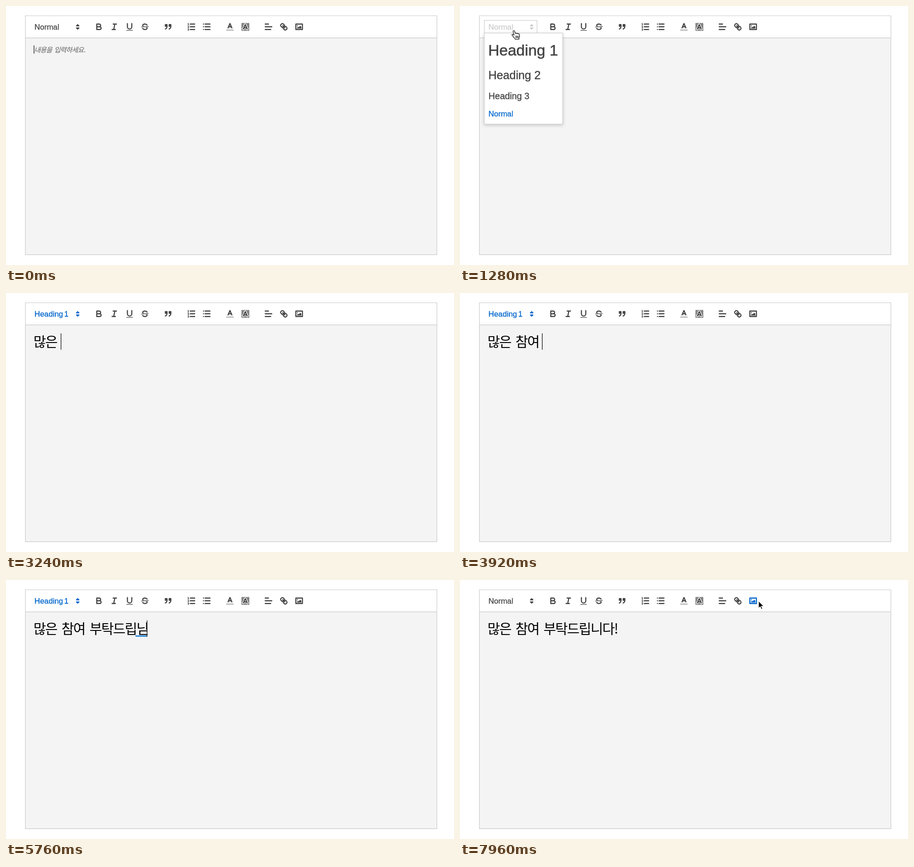
Recreate the animation shown at these times as an HTML page. Size 983 by 570 pixels, loop 8000 ms.

```html
<!DOCTYPE html>
<html lang="ko">
<head>
<meta charset="utf-8">
<title>Text editor</title>
<style>
  html, body { margin: 0; width: 100%; height: 100%; overflow: hidden; background: #fff; }
  svg { display: block; width: 983px; height: 570px; }
  .ui { font: 16.8px "Liberation Sans", Arial, sans-serif; fill: currentColor; stroke: currentColor; stroke-width: .018em; }
  .ko { font-family: "Noto Sans CJK KR", "Noto Sans CJK", sans-serif; }
  .hint { font-size: 15px; font-style: italic; letter-spacing: -.9px; word-spacing: 1.65px; fill: #000; fill-opacity: .6; }
  .title { font-size: 30px; letter-spacing: -1.8px; word-spacing: 3.3px; white-space: pre; }
  .icon { color: #444; fill: none; stroke: currentColor; stroke-width: 2; stroke-linecap: round; stroke-linejoin: round; }
  .icon .solid { fill: currentColor; stroke: none; }
  .icon .both { fill: currentColor; }
  .icon .even { fill: currentColor; fill-rule: evenodd; }
  .icon .thin { stroke-width: 1; }
  .icon .faint { opacity: .4; }
  .icon .halo { stroke: #fff; stroke-width: 4.2; }
  #list { color: #444; }
</style>
</head>
<body>
<svg viewBox="0 0 983 570">
  <defs>
    <pattern id="hatch" width="2.1" height="2.1" patternUnits="userSpaceOnUse" patternTransform="rotate(40)">
      <rect width="1" height="2.1" fill="currentColor"/>
    </pattern>
    <filter id="shadow" x="-20%" y="-20%" width="140%" height="140%">
      <feDropShadow dx="0" dy="2" stdDeviation="3.6" flood-color="#000" flood-opacity=".2"/>
    </filter>
  </defs>

  <rect x="42.5" y="70" width="903" height="477.3" fill="#f4f4f4"/>
  <path d="M42.5 21.5H945.5V547.4H42.5ZM42.5 70.2H945.5" fill="none" stroke="#c9c9c9" stroke-width="1.2"/>

  <text id="hint" class="ko hint" x="62" y="101.6">내용을 입력하세요.</text>
  <text id="title" class="ko title" x="60.2" y="118"></text>
  <rect id="compose" y="122" width="25.2" height="2.7" fill="#1a7fdc"/>
  <rect id="caret" width="1.2"/>

  <g id="icons"></g>

  <g id="picker">
    <rect id="frame" x="53.3" y="31.6" width="115.6" height="28" fill="none" stroke="#ccc" stroke-width="1.2"/>
    <text id="label" class="ui" x="62.6" y="52"></text>
    <g class="icon" style="color:inherit" transform="translate(146.5 35.2) scale(1.2)">
      <path class="solid" d="M6 11.4 9 14.2 12 11.4V10H6ZM6 6.6 9 3.8 12 6.6V8H6Z" stroke-linejoin="round"/>
    </g>
  </g>

  <g id="list">
    <rect x="53.3" y="59.5" width="172" height="200.4" fill="#fff" stroke="#ccc" stroke-width="1.2" filter="url(#shadow)"/>
    <text id="first" class="ui" x="62" y="109" style="font-size:33.6px">Heading 1</text>
    <text class="ui" x="62.2" y="161.4" style="font-size:25.2px">Heading 2</text>
    <text class="ui" x="62.5" y="205" style="font-size:19.66px">Heading 3</text>
    <text class="ui" x="62.6" y="242.5" style="color:#06c">Normal</text>
  </g>

  <g id="mouse">
    <g id="beam" fill="none" stroke-linecap="round">
      <path id="beamShape" d="M-3.4-9C-1.4-9 0-8.2 0-6.6V6.6C0 8.2-1.4 9-3.4 9M3.4-9C1.4-9 0-8.2 0-6.6M0 6.6C0 8.2 1.4 9 3.4 9M-2 .8H2" stroke="#fff" stroke-width="3"/>
      <use href="#beamShape" style="stroke:#111"/>
      <path d="M-3.4-9C-1.4-9 0-8.2 0-6.6V6.6C0 8.2-1.4 9-3.4 9M3.4-9C1.4-9 0-8.2 0-6.6M0 6.6C0 8.2 1.4 9 3.4 9M-2 .8H2" stroke="#111" stroke-width="1.4"/>
    </g>
    <g id="hand" fill="#fff" stroke="#111" stroke-width="1.3" stroke-linejoin="round" stroke-linecap="round">
      <path d="M-1.6 .9C-1.9-.8.8-1.6 1.6.4L3.6 5.6C4.1 4.3 6.3 4.4 6.8 5.9C7.3 4.9 9.2 5 9.7 6.4C10.4 5.7 12 6 12.2 7.6C13 10.5 13 12.5 11.4 15V18.2H3.2C2.8 16.4 0 14.4-1.6 11.8C-2.6 10.2-3.8 9.4-4 8.4C-3.9 6.8-1.8 7 .6 9Z"/>
      <path d="M4.6 11v4M7 11v4M9.4 11v4" fill="none"/>
    </g>
    <path id="arrow" d="M0 0V16.4L3.7 12.8 6.2 18.6 8.9 17.5 6.4 11.8H11.6Z" fill="#000" stroke="#fff" stroke-width="1.3"/>
  </g>
</svg>

<script>
const LOOP = 8000, BLUE = '#06c', GREY = '#444', LIGHT = '#ccc';
const OPEN = 1200, PICK = 1960, TYPE = 2360, LAST_KEY = 6040, BLUR = 7800, DIALOG = 7900;
const $ = id => document.getElementById(id);

const path = (d, cls = '') => `<path class="${cls}" d="${d}"/>`;
const letterA = (y, cls) => path(`M5.5 ${y}L9 ${y - 8} 12.5 ${y}M11.63 ${y - 2}H6.38`, cls);

// Each icon: centre x and its drawing on an 18-unit grid.
const icons = [
  [204, path('M5 4H9.5A2.5 2.5 0 0 1 9.5 9H5ZM5 9H10.5A2.5 2.5 0 0 1 10.5 14H5Z')],
  [237.6, path('M7 4H13M5 14H11M8 14L10 4')],
  [271.2, path('M5 3V9a4 4 0 0 0 8 0V3') + '<rect class="solid" x="3" y="15" width="12" height="1" rx=".5"/>'],
  [304.8, path('M15.5 8.5L2.5 9.5', 'thin') +
    path('M9 8C6.54 7.79 6 7.52 6 6.5 6 5.79 7.28 5 9 5c1.57 0 2.77.68 2.97 1.31a1 1 0 0 0 1.9-.62C13.36 4.1 11.35 3 9 3 6.2 3 4 4.54 4 6.5a3.2 3.2 0 0 0 .5 1.84Z', 'solid') +
    path('M9 10C11.46 10.21 12 10.48 12 11.5c0 .71-1.28 1.5-3 1.5-1.57 0-2.77-.68-2.97-1.31a1 1 0 1 0-1.9.62C4.64 13.9 6.65 15 9 15c2.8 0 5-1.54 5-3.5a3.2 3.2 0 0 0-.5-1.84Z', 'solid')],
  [355.7, [4, 11].map(x => path(`M${x} 5h3v3h-3Z`, 'both') + path(`M${x + 3} 8c0 4.03-3 5-3 5`, 'even')).join('')],
  [406.8, path('M7 4H15M7 9H15M7 14H15') + path('M2.4 3L3.5 2.5V5.5M2.5 5.5H4.5', 'thin') +
    path('M4.5 10.5h-2c0-.23 1.85-1.08 1.85-2.23A.96.96 0 0 0 2.5 8.16', 'thin') +
    path('M2.5 14.85a.96.96 0 0 0 1.85-.11A.7.7 0 0 0 3.75 14a.69.69 0 0 0 .6-.74.96.96 0 0 0-1.85-.11', 'thin')],
  [440.4, path('M6 4H15M6 9H15M6 14H15M3 4h0M3 9h0M3 14h0')],
  [491.4, letterA(11) + path('M3 15H15', 'faint')],
  [525, '<rect x="2" y="2" width="14.4" height="14.4" fill="url(#hatch)" stroke="none"/>' + letterA(13, 'halo') + letterA(13)],
  [576, path('M3 9H15M3 14H13M3 4H9')],
  [609.6, path('M7 7L11 11') +
    path('M8.9 4.58a3.48 3.48 0 0 1 .36 4.68A3.48 3.48 0 0 1 4.58 8.9C3.19 7.5 2.04 6.4 4.22 4.22S7.5 3.19 8.9 4.58Z') +
    path('M13.42 9.1a3.48 3.48 0 0 0-4.68-.36 3.48 3.48 0 0 0 .36 4.68c1.39 1.39 2.5 2.54 4.68.36S14.8 10.5 13.42 9.1Z')],
  [643.2, path('M3 4H15V14H3Z') + '<circle class="solid" cx="6" cy="7" r="1"/>' +
    path('M5 12V11L7 9 8 10 11 7 13 9V12Z', 'solid')]
];
$('icons').innerHTML = icons.map(([x, art]) =>
  `<g class="icon" transform="translate(${x - 10.8} 35) scale(1.2)">${art}</g>`).join('');
const iconNodes = [...$('icons').children];

// Keystrokes: time and the text after it.
const typing = [
  [2360, 'ㅁ'], [2480, '마'], [2640, '만'], [2800, '많'], [2920, '많ㅇ'], [3000, '많으'], [3120, '많은'], [3240, '많은 '],
  [3360, '많은 ㅊ'], [3440, '많은 차'], [3520, '많은 참'], [3600, '많은 참ㅇ'], [3720, '많은 참여'], [3880, '많은 참여 '],
  [4040, '많은 참여 ㅂ'], [4200, '많은 참여 부'], [4360, '많은 참여 붙'], [4480, '많은 참여 부타'], [4600, '많은 참여 부탁'],
  [4800, '많은 참여 부탁ㄷ'], [4960, '많은 참여 부탁드'], [5280, '많은 참여 부탁들'], [5360, '많은 참여 부탁드리'],
  [5440, '많은 참여 부탁드립'], [5560, '많은 참여 부탁드립ㄴ'], [5640, '많은 참여 부탁드립니'],
  [5760, '많은 참여 부탁드립닏'], [5880, '많은 참여 부탁드립니다'], [LAST_KEY, '많은 참여 부탁드립니다!']
];

// Pointer hotspot: time, x, y.
const moves = [
  [560, 630, 398], [680, 575, 362], [880, 380, 228], [1060, 180, 98], [1180, 122, 57], [1240, 118, 55],
  [1400, 118, 55], [1520, 123, 66], [1700, 136, 97], [1800, 140, 106], [TYPE, 140.3, 106.7],
  [6440, 140.3, 106.7], [6560, 200, 103], [6840, 462.5, 95.5], [7040, 625, 120], [7160, 670, 137],
  [7320, 670, 138], [7440, 665, 90], [7600, 655, 46], [LOOP, 655, 46]
];

function pointer(t) {
  const i = Math.max(1, moves.findIndex(m => m[0] > t));
  const [a, b] = [moves[i - 1], moves[i]];
  const k = (t - a[0]) / (b[0] - a[0]);
  return [1, 2].map(n => a[n] + (b[n] - a[n]) * k);
}

const show = (id, on) => { $(id).style.display = on ? '' : 'none'; };
const charWidth = c => c === ' ' ? 8.2 : c === '!' ? 8.6 : 25.8;

function drawPointer(t, open) {
  const visible = t >= 560 && t < TYPE || t >= 6440;
  show('mouse', visible);
  if (!visible) return { picker: false, item: false, icon: -1 };
  const [x, y] = pointer(t);
  const bar = y > 31 && y < 60;
  const picker = bar && x > 53 && x < 170;
  const menu = open && x > 53 && x < 225 && y > 59 && y < 260;
  const icon = bar ? icons.findIndex(([cx]) => Math.abs(x - cx) < 16.8) : -1;
  const kind = t >= DIALOG ? 'arrow' : picker || menu || icon >= 0 ? 'hand' : y < 70 ? 'arrow' : 'beam';
  for (const id of ['beam', 'hand', 'arrow']) show(id, id === kind);
  $('mouse').setAttribute('transform', `translate(${x} ${y})`);
  return { picker, item: menu && y > 64 && y < 127, icon };
}

function drawText(t) {
  const heading = t >= PICK;
  const text = typing.filter(k => k[0] <= t).map(k => k[1]).pop() || '';
  const width = [...text].reduce((sum, c) => sum + charWidth(c), 0);
  const composing = text && !/[ !]$/.test(text);
  $('title').textContent = text;
  show('hint', !heading);
  show('compose', composing);
  if (composing) $('compose').setAttribute('x', 61 + width - 25.5);

  const since = t < 560 ? 0 : t < PICK ? t - 60 : t < LAST_KEY ? 0 : t - LAST_KEY;
  show('caret', t < BLUR && Math.floor(since / 500) % 2 === 0);
  const caret = $('caret');
  caret.setAttribute('x', 60.9 + width - (width ? .6 : 0));
  caret.setAttribute('y', heading ? 88.8 : 86.8);
  caret.setAttribute('height', heading ? 36 : 18);
}

function render(t) {
  const open = t >= OPEN && t < PICK;
  const heading = t >= PICK && t < BLUR;
  const over = drawPointer(t, open);
  drawText(t);
  show('list', open);
  show('frame', open);
  $('label').textContent = heading ? 'Heading 1' : 'Normal';
  $('label').style.wordSpacing = heading ? '-2px' : '';
  $('picker').style.color = open ? LIGHT : heading || over.picker ? BLUE : GREY;
  $('first').style.color = over.item ? BLUE : GREY;
  iconNodes.forEach((node, i) => { node.style.color = i === over.icon ? BLUE : GREY; });
}

function tick() {
  render(performance.now() % LOOP);
  requestAnimationFrame(tick);
}
tick();
</script>
</body>
</html>
```
